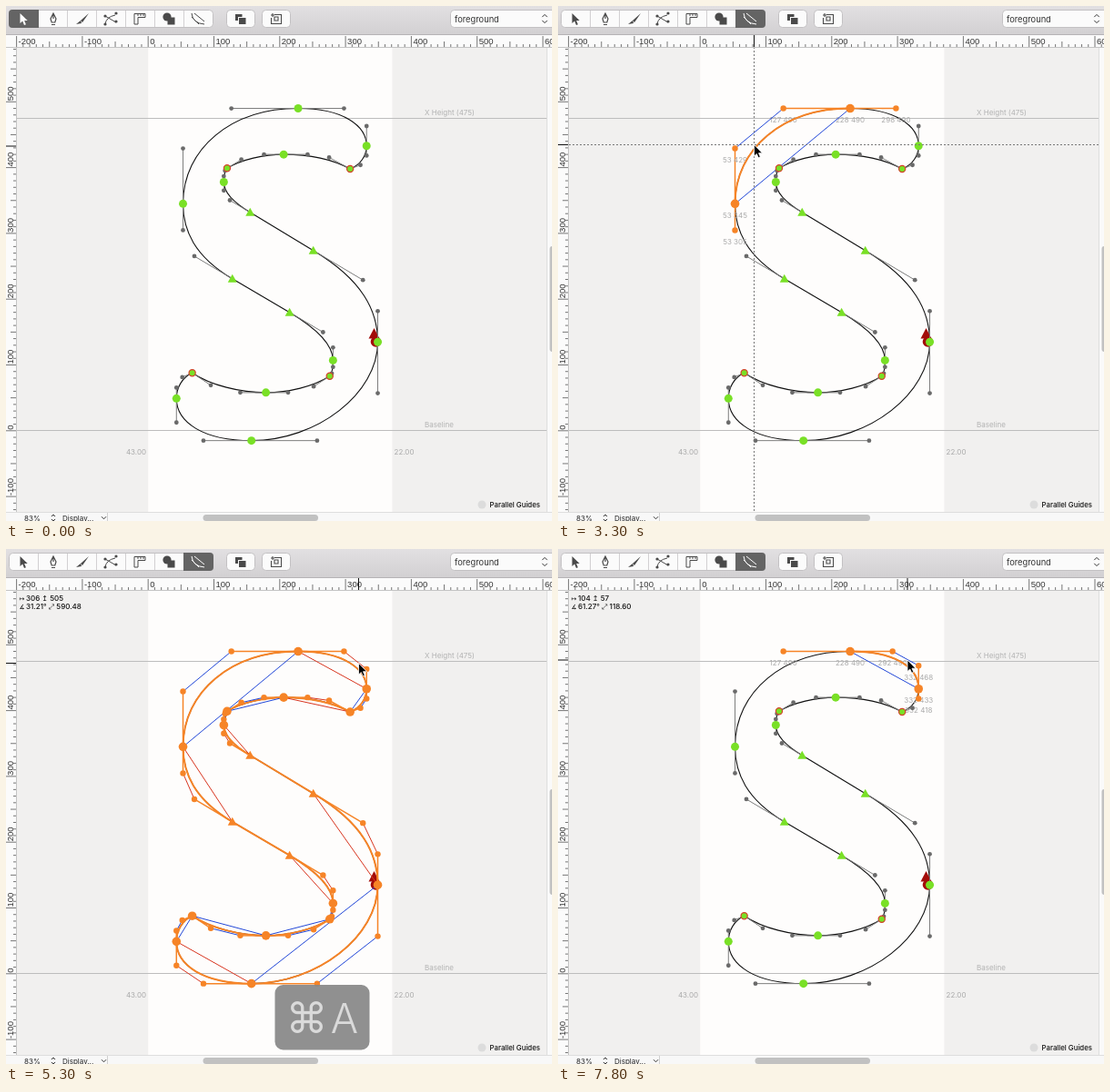
An HTML page with a canvas for the animation above (8 s loop, 600 px wide and 566 px high).

```html
<!DOCTYPE html>
<html lang="en">
<head>
<meta charset="utf-8">
<title>Glyph editor</title>
<style>
html, body { margin: 0; width: 100%; height: 100%; overflow: hidden; }
canvas { display: block; }
</style>
</head>
<body>
<canvas id="stage" width="600" height="566"></canvas>
<script>
const ctx = document.getElementById('stage').getContext('2d');
const LOOP = 8000, STEP = 100;
const UI = 'Inter, "DejaVu Sans", sans-serif', RULER = '9.5px "Liberation Sans", Arial, sans-serif';
const GREEN = '#79e026', ORANGE = '#f68427', RED = '#d8351f', BLUE = '#2348d8', INK = '#4a4a4a';

// Nodes in font units. Flat and steep nodes are extremes, slants end the straight diagonals.
// A node may override the reach of the two handles on the curve that arrives at it.
const NODES = [
  ['corner', 120, 399], ['flat', 206, 420], ['corner', 307, 398, 0.6, 0.79],
  ['steep', 332, 433], ['flat', 228, 490, 0.527, 0.67], ['steep', 53, 345],
  ['slant', 128, 231], ['slant', 215, 180], ['steep', 281, 107],
  ['corner', 276, 83], ['flat', 179, 58], ['corner', 67, 88],
  ['steep', 43, 49], ['flat', 157, -15, 0.57, 0.64], ['steep', 349, 135, 0.52, 0.52],
  ['slant', 251, 274], ['slant', 155, 332], ['steep', 115, 378]
].map(([kind, x, y, depart, arrive]) => ({ kind, x, y, depart, arrive }));
const REACH = { flat: 0.58, steep: 0.58, slant: 0.77, corner: 0.63 };
const SLOPE = -0.595;
const TOP_RIGHT = 4, TOP_LEFT = 5;

// Pointer moves: start, end, destination
const MOVES = [
  [0, 900, 206, 18], [1500, 2200, 215.5, 152.5], [3300, 3600, 385.5, 129.5],
  [3800, 4000, 385.5, 203], [4000, 4300, 385.5, 133.5], [4500, 5300, 387.5, 125.5],
  [7000, 7400, 384, 122]
];
const PRESSES = [[2300, 3400], [3600, 3900], [6200, 7600]];

const ramp = (t, a, b) => Math.max(0, Math.min(1, (t - a) / (b - a)));
const mix = (a, b, k) => a + (b - a) * k;
const between = (t, a, b) => t >= a && t < b;
const toX = u => 156.2 + u * 0.723;
const toY = v => 466.8 - v * 0.723;
const px = p => [toX(p.x), toY(p.y)];
const pull = t => Math.sin(Math.PI * ramp(t, 2300, 3300));

function rect(x, y, w, h, fill) {
  ctx.fillStyle = fill;
  ctx.fillRect(x, y, w, h);
}
function paint(fill, stroke, width = 1) {
  if (fill) { ctx.fillStyle = fill; ctx.fill(); }
  if (stroke) { ctx.strokeStyle = stroke; ctx.lineWidth = width; ctx.stroke(); }
}
function box(x, y, w, h, r, fill, stroke) {
  ctx.beginPath();
  ctx.roundRect(x, y, w, h, r);
  paint(fill, stroke);
}
function dot(x, y, r, fill, stroke, width) {
  ctx.beginPath();
  ctx.arc(x, y, r, 0, 7);
  paint(fill, stroke, width);
}
function line(x1, y1, x2, y2, color, width = 1) {
  ctx.beginPath();
  ctx.moveTo(x1, y1);
  ctx.lineTo(x2, y2);
  paint(null, color, width);
}
function shape(x, y, d, fill, stroke, width = 1) {
  const path = new Path2D(d);
  ctx.save();
  ctx.translate(x, y);
  if (fill) { ctx.fillStyle = fill; ctx.fill(path); }
  if (stroke) { ctx.strokeStyle = stroke; ctx.lineWidth = width; ctx.stroke(path); }
  ctx.restore();
}
function text(str, x, y, color, font = '8px ' + UI, align = 'left') {
  ctx.font = font;
  ctx.textAlign = align;
  ctx.fillStyle = color;
  ctx.fillText(str, x, y);
}

function pointerAt(t) {
  let x = 608, y = 154;
  for (const [start, end, toX, toY] of MOVES) {
    const k = ramp(t, start, end);
    x = mix(x, toX, k);
    y = mix(y, toY, k);
  }
  return [x - 4 * pull(t), y - 3 * pull(t)];
}

// Point where the tangents of two neighbouring nodes meet.
function apex(p, q) {
  const pick = (...kinds) => [p, q].find(n => kinds.includes(n.kind));
  const flat = pick('flat'), steep = pick('steep'), other = pick('corner', 'slant');
  if (!other) return { x: steep.x, y: flat.y };
  if (other.kind === 'slant') return { x: steep.x, y: other.y + SLOPE * (steep.x - other.x) };
  return flat ? { x: mix(flat.x, other.x, 0.6), y: flat.y }
              : { x: steep.x, y: mix(steep.y, other.y, 0.73) };
}

function segmentsAt(t) {
  return NODES.map((end, i) => {
    const start = NODES.at(i - 1), s = { start, end };
    if (start.kind === 'slant' && end.kind === 'slant') return s;
    let depart = end.depart || REACH[start.kind], arrive = end.arrive || REACH[end.kind];
    if (i === TOP_LEFT) depart = arrive += 0.07 * pull(t);
    if (i === TOP_RIGHT) {
      depart += 0.05 * ramp(t, 6200, 6600) + 0.043 * ramp(t, 6900, 7400);
      arrive -= 0.01 * ramp(t, 6200, 6600) + 0.04 * ramp(t, 6900, 7400);
    }
    const top = apex(start, end);
    const a = s.a = { x: mix(start.x, top.x, depart), y: mix(start.y, top.y, depart) };
    const b = s.b = { x: mix(end.x, top.x, arrive), y: mix(end.y, top.y, arrive) };
    const angle = (p, q) => Math.atan2(q.y - p.y, q.x - p.x);
    s.color = Math.abs(Math.sin(angle(a, b) - angle(start, end))) < 0.05 ? BLUE : RED;
    return s;
  });
}

function selectionAt(t) {
  if (t < 2300) return [];
  if (t < 3600) return [TOP_LEFT];
  if (between(t, 4600, 6200)) return [...NODES.keys()];
  return [TOP_RIGHT];
}

function drawBackground() {
  rect(0, 0, 600, 566, '#f1f0ef');
  rect(toX(0), 45, toX(371) - toX(0), 511, '#fefdfc');
  for (const y of [123.5, 466.5]) line(12, y, 594, y, '#bdbdbd');
  text('X Height (475)', 460, 120, '#b2b2b2');
  text('Baseline', 460, 463, '#b2b2b2');
  text('43.00', 154, 493, '#a9a9a9', undefined, 'right');
  text('22.00', 426.5, 493, '#a9a9a9');
  dot(523, 548, 4.5, '#dcdcdc');
  text('Parallel Guides', 531.5, 551, '#111', '500 7.8px ' + UI);
}

function tracePath(s) {
  ctx.beginPath();
  ctx.moveTo(...px(s.start));
  if (s.a) ctx.bezierCurveTo(...px(s.a), ...px(s.b), ...px(s.end));
  else ctx.lineTo(...px(s.end));
}

function drawNode(node, selected) {
  const [x, y] = px(node), color = selected ? ORANGE : GREEN;
  if (node.kind === 'slant') shape(x, y, 'M0-5L5 4H-5Z', color);
  else if (selected) dot(x, y, 4.8, color);
  else if (node.kind === 'corner') dot(x, y, 3.6, color, '#d5402c', 1.2);
  else dot(x, y, 4.5, color);
}

function drawGlyph(t) {
  const segments = segmentsAt(t), selected = selectionAt(t);
  const all = selected.length > 1;
  const joints = segments.map((s, i) => {
    const next = (i + 1) % segments.length;
    return {
      node: s.end,
      on: selected.includes(i) || selected.includes(next),
      handles: [s.b, segments[next].a].filter(Boolean)
    };
  });

  for (const s of segments) { tracePath(s); paint(null, '#111', 1.1); }
  shape(404.5, 354, 'M0 0L6 11.5H-6Z', '#a30d0a');
  dot(406.5, 369, 5.8, '#a30d0a');

  for (const { node, on, handles } of joints) {
    for (const h of handles) line(...px(node), ...px(h), on ? ORANGE : '#7d7d7d', on ? 1.5 : 1);
    if (!on || all) continue;
    for (const p of [node, ...handles]) {
      const label = Math.round(p.x) + ' ' + Math.round(p.y);
      text(label, toX(p.x), toY(p.y) + 15.5, '#aaa', undefined, 'center');
    }
  }
  for (const s of selected.map(i => segments[i])) {
    tracePath(s);
    paint(null, ORANGE, 2);
    if (!s.a) continue;
    const held = !all && between(t, 6400, 7500);
    line(...px(s.start), ...px(s.end), s.color);
    line(...px(s.a), ...px(s.b), s.color, held ? 3 : 1);
  }
  for (const { node, on, handles } of joints) {
    for (const h of handles) dot(...px(h), on ? 3.2 : 2.4, on ? ORANGE : '#6a6a6a');
    drawNode(node, on);
  }
}

function drawMeasure(t) {
  if (t < 3400) return;
  const points = selectionAt(t - STEP).flatMap(i => [NODES.at(i - 1), NODES[i]]);
  const extent = axis => {
    const values = points.map(p => p[axis]);
    return Math.max(...values) - Math.min(...values);
  };
  const dx = extent('x'), dy = extent('y'), angle = Math.atan2(dx, dy) * 180 / Math.PI;
  const font = '500 8px ' + UI;
  text('↦', 14.5, 57, '#111', '7px ' + UI);
  text(`${dx} ↥ ${dy}`, 22, 57, '#111', font);
  text('∡', 14.5, 66, '#111', '7px ' + UI);
  text(`${angle.toFixed(2)}° ⤢ ${Math.hypot(dx, dy).toFixed(2)}`, 22, 66, '#111', font);
}

function drawCrosshair(t) {
  const press = PRESSES.find(([down, up]) => between(t, down, up));
  if (!press) return;
  const [x, y] = pointerAt(press[0]);
  ctx.setLineDash([2, 2]);
  line(x, 45, x, 556, '#777');
  line(12, y, 594, y, '#777');
  ctx.setLineDash([]);
}

function drawRulers([mx, my]) {
  rect(0, 31, 600, 14, '#fbfbfb');
  rect(0, 45, 11, 511, '#fbfbfb');
  line(0, 45.5, 600, 45.5, '#c4c4c4');
  line(11.5, 45, 11.5, 556, '#c4c4c4');
  for (let n = -200; n <= 610; n += 10) {
    const x = toX(n), y = toY(n), onRuler = between(y, 46, 556);
    const size = n % 100 === 0 ? 12 : n % 50 === 0 ? 6 : 3;
    if (x > 11) line(x, 45, x, 45 - size, '#555', 0.8);
    if (onRuler) line(11, y, 11 - size, y, '#555', 0.8);
    if (n % 100) continue;
    text(n, x + 2, 42, '#333', RULER);
    if (!onRuler) continue;
    ctx.save();
    ctx.translate(7.5, y - 1);
    ctx.rotate(-Math.PI / 2);
    text(n, 0, 0, '#333', RULER);
    ctx.restore();
  }
  line(mx, 32, mx, 45, '#111');
  if (my > 45) line(0, my, 11, my, '#111');
}

function drawToolbar(t) {
  const shade = ctx.createLinearGradient(0, 0, 0, 31);
  shade.addColorStop(0, '#e2e0e2');
  shade.addColorStop(1, '#d2d0d2');
  rect(0, 0, 600, 31, shade);
  line(0, 31.5, 600, 31.5, '#b5b3b5');

  for (const [x, w] of [[3.5, 224], [242.5, 31], [281.5, 31], [488.5, 120]]) {
    box(x, 4.5, w, 19, 4, '#fbfbfb', '#c3c1c3');
  }
  for (let i = 1; i < 7; i++) line(3.5 + i * 32, 5, 3.5 + i * 32, 23, '#d2d0d2');
  const active = t < 1400 ? 0 : 6;
  box(3 + active * 32, 4, 33, 20, active ? [0, 4, 4, 0] : [4, 0, 0, 4], '#646464');

  const arrow = t < 1400 ? '#fff' : INK, guides = t < 1400 ? INK : '#fff';
  shape(15.5, 8, 'M0 0V11L2.7 8.6 4.5 13 6.4 12.2 4.6 8H8.2Z', arrow);
  shape(52, 14, 'M0-6L-3 0-1.8 4H1.8L3 0ZV0M-2 6.5H2', null, INK, 1.2);
  shape(84, 14, 'M7-6L-2 2 0 4ZM-2 2L-7 6-1 5Z', INK);
  shape(115, 14, 'M-6 6Q-5-2 5-4M-6-3L6 4', null, INK);
  for (const side of [-6, 6]) { dot(115 + side, 14 + side / 2, 1.6, INK); dot(115 + side, 14 - side, 1.6, INK); }
  shape(147, 14, 'M-6 6V-5.5H6V-1.5H-2V6ZM-2-5V-3M1-5V-3M4-5V-3', null, INK);
  dot(177, 12, 4.6, INK);
  rect(177.5, 12.5, 8, 8, INK);
  shape(211, 14, 'M-7-6Q-6 5 7 6M-4-6L7 3M-7-2L1 6', null, guides);
  rect(252, 9, 7.5, 7, INK);
  shape(260, 17, 'M-4 0V-4H0', null, '#fbfbfb', 2);
  rect(256, 13, 7.5, 7, INK);
  shape(297, 14, 'M-2-4.5H5.5V5.5H-5.5V-1M-2 2V-2H2V2ZM-6-4H-2M-4-6V-2', null, INK, 1.1);
  text('foreground', 493, 17.5, '#333', '9.3px ' + UI);
  drawStepper(592, 14, 1.3);
}

function drawStepper(x, y, scale) {
  for (const side of [-1, 1]) chevron(x, y + side * 2.5 * scale, 2.1 * scale, side);
}
function chevron(x, y, r, side) {
  shape(x, y, `M${-r} ${-r * side / 2}L0 ${r * side / 2}L${r} ${-r * side / 2}`, null, '#333');
}

function drawScrollbars() {
  rect(594, 46, 6, 520, '#fafafa');
  line(594.5, 46, 594.5, 556, '#dedede');
  box(597.5, 264, 6, 116, 3, '#c1c1c1');
  rect(0, 556, 600, 10, '#f8f8f8');
  line(0, 556.5, 600, 556.5, '#dedede');
  box(216.5, 559, 126.5, 7, 3.5, '#c1c1c1');
  text('83%', 20, 566, '#222');
  drawStepper(52, 562.5, 1);
  text('Display...', 62, 566, '#222');
  chevron(107.5, 562.5, 2.5, 1);
  line(111.5, 557, 111.5, 566, '#d0d0d0');
}

function drawShortcut(t) {
  const alpha = ramp(t, 4500, 4700) * (1 - ramp(t, 5500, 5900));
  if (!alpha) return;
  ctx.globalAlpha = alpha;
  box(295.5, 479, 104, 71.5, 9, 'rgba(136,136,136,.93)');
  text('⌘', 330.5, 532, '#dadada', '46px "DejaVu Sans", sans-serif', 'center');
  text('A', 372, 531.5, '#dadada', '300 45px Inter, sans-serif', 'center');
  ctx.globalAlpha = 1;
}

function render(now) {
  const t = Math.floor(now % LOOP / STEP) * STEP;
  const pointer = pointerAt(t);
  drawBackground();
  drawGlyph(t);
  drawMeasure(t);
  drawCrosshair(t);
  drawRulers(pointer);
  drawScrollbars();
  drawToolbar(t);
  drawShortcut(t);
  shape(...pointer, 'M0 0V12.5L2.8 10 4.7 14.2 6.8 13.3 5 9.2H9Z', '#000', '#fff', 0.8);
  requestAnimationFrame(() => render(performance.now()));
}
render(0);
</script>
</body>
</html>
```
